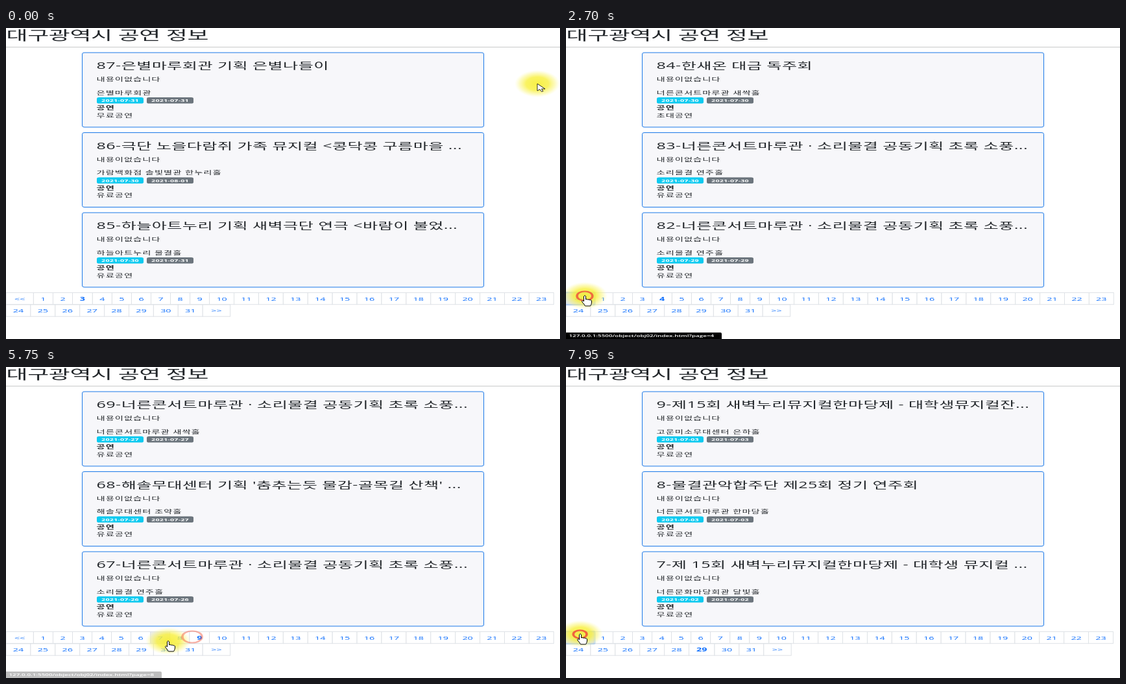
Recreate the animation shown at these times as an HTML page. Size 854x480 px, loop 8 s.

```html
<!DOCTYPE html>
<html lang="ko">
<head>
<meta charset="utf-8">
<title>공연 정보</title>
<style>
html, body { margin: 0; width: 100%; height: 100%; overflow: hidden; background: #fff; }
svg { display: block; width: 854px; height: 480px; }
text {
  font-family: "Open Sans", "Noto Sans CJK KR", "Noto Sans CJK", sans-serif;
  font-size: 16px; fill: #212529; white-space: pre;
}
.head { font-size: 40px; letter-spacing: -.4px; }
.title { font-size: 28px; letter-spacing: .5px; }
.body, .kind { letter-spacing: 1.05px; }
.kind { font-weight: 700; }
.badge { font-size: 12px; font-weight: 700; fill: #fff; letter-spacing: .2px; text-anchor: middle; }
.link, .active { fill: #0d6efd; text-anchor: middle; }
.active { font-weight: 700; }
.url { font-size: 11px; font-weight: 600; fill: #fff; }
</style>
</head>
<body>
<svg viewBox="0 0 854 480">
  <defs>
    <radialGradient id="glow">
      <stop offset="0" stop-color="#f7ee2c" stop-opacity=".88"/>
      <stop offset=".5" stop-color="#f8f03c" stop-opacity=".8"/>
      <stop offset=".78" stop-color="#faf46a" stop-opacity=".42"/>
      <stop offset="1" stop-color="#fdfaa0" stop-opacity="0"/>
    </radialGradient>
  </defs>
  <rect width="854" height="480" fill="#fff"/>
  <g id="header"></g>
  <g id="cards"></g>
  <g id="pager"></g>
  <g id="status"></g>
  <g id="pointer">
    <ellipse rx="35" ry="21" fill="url(#glow)"/>
  </g>
  <g id="ring" fill="none" stroke="#f0523a" stroke-width="3.6"><circle/></g>
  <g id="cursor" fill="#fff" stroke="#000">
    <path id="arrow" transform="scale(1 .64)" d="M0 0V17L4 13.5L6.5 19L9 18L6.5 12.5H12Z"/>
    <path id="hand" d="M-1.5 1Q0-1.5 1.5 1V6Q3 4.7 4.5 6.3Q6 5.3 7.5 6.8Q9.5 6 10.5 8V11Q10 14 8.5 16H.5Q-1 13-4 10Q-5 8-3.5 7.6Q-2.5 7.7-1.5 9Z"/>
  </g>
</svg>
<script>
const LOOP = 8000, STEP = 50;
const $ = id => document.getElementById(id);

// The whole page is squeezed by one common scale
const text = (x, y, cls, s) =>
  `<text class="${cls}" transform="translate(${x} ${y}) scale(.897 .5)">${s}</text>`;
const rect = (x, y, w, h, attrs) =>
  `<rect x="${x}" y="${y}" width="${w}" height="${h}" ${attrs}/>`;

const FREE = '무료공연', PAID = '유료공연', GUEST = '초대공연';
const HALL = '너른콘서트마루관', STAGE = '해솔무대센터', ROOM = '소리물결 연주홀';
const SUMMER = HALL + ' · 소리물결 공동기획 초록 소풍...';
const ART = STAGE + " 기획 '춤추는듯 물감-골목길 산책' ...";
const FEST = '새벽누리뮤지컬한마당제 - 대학생';

// title, place, first day, last day, price
const SHOWS = {
  1: [
    [ART, STAGE + ' 조약홀', '07-31', '07-31', PAID],
    ["윤서람 X 미온 콘서트 'Her Lanterns : 물결'", '물빛원 너울강당관', '07-31', '07-31', PAID],
    [SUMMER, HALL + ' 한마당홀', '07-31', '07-31', PAID]],
  3: [
    ['은별마루회관 기획 은별나들이', '은별마루회관', '07-31', '07-31', FREE],
    ['극단 노을다람쥐 가족 뮤지컬 &lt;콩닥콩 구름마을 ...', '가람백화점 솔빛별관 한누리홀', '07-30', '08-01', PAID],
    ['하늘아트누리 기획 새벽극단 연극 &lt;바람이 불었...', '하늘아트누리 물결홀', '07-30', '07-31', PAID]],
  4: [
    ['한새온 대금 독주회', HALL + ' 새싹홀', '07-30', '07-30', GUEST],
    [SUMMER, ROOM, '07-30', '07-30', PAID],
    [SUMMER, ROOM, '07-29', '07-29', PAID]],
  9: [
    [SUMMER, HALL + ' 새싹홀', '07-27', '07-27', PAID],
    [ART, STAGE + ' 조약홀', '07-27', '07-27', PAID],
    [SUMMER, ROOM, '07-26', '07-26', PAID]],
  29: [
    ['제15회 ' + FEST + '뮤지컬잔...', '고운미소무대센터 은하홀', '07-03', '07-03', FREE],
    ['물결관악합주단 제25회 정기 연주회', HALL + ' 한마당홀', '07-03', '07-03', PAID],
    ['제 15회 ' + FEST + ' 뮤지컬 ...', '너른문화마당회관 달빛홀', '07-02', '07-02', FREE]]
};
const SIMILAR = { 2: 1, 5: 9, 6: 9, 12: 9, 16: 4, 28: 29, 30: 29 };

// time, x, y
const PATH = [
  [0, 819, 86], [200, 819, 86], [700, 145, 414], [800, 145, 414], [1400, 43, 414],
  [1670, 316, 437], [1900, 316, 437], [2250, 28, 414], [2700, 29, 413], [3450, 27, 415],
  [4280, 409, 418], [4350, 409, 418], [4720, 560, 418], [4800, 560, 418], [5250, 287, 416],
  [5450, 287, 416], [6250, 170, 438], [6450, 170, 437], [7000, 315, 437], [7050, 315, 437],
  [7150, 311, 437], [7420, 314, 437], [7830, 21, 412], [7950, 22, 412]
];
// time, page opened
const CLICKS = [
  [800, 4], [1700, 5], [1850, 6], [2300, 5], [2600, 4], [2900, 3], [3150, 2], [3400, 1],
  [4300, 12], [4750, 16], [5300, 9], [6300, 28], [7050, 29], [7400, 30], [7900, 29]
];
// time, page in the link address, opacity
const LINKS = [
  [0, 3, 0], [1050, 3, 1], [1200, 2, 1], [1400, 1, 1], [1650, 5, 1], [1850, 6, 1],
  [2150, 3, 1], [2300, 5, 1], [2600, 4, 1], [2850, 3, 1], [3100, 2, 1], [3350, 1, 1],
  [3850, 5, 1], [4150, 12, 1], [4700, 16, 1], [5150, 9, 1], [5550, 8, 1], [5700, 8, .5],
  [5750, 8, .25], [5800, 8, 0], [6100, 28, 1], [6900, 28, 0], [7250, 30, 1], [7700, 30, 0]
];

const lastBefore = (list, t) => list.filter(e => e[0] <= t).pop();

function cursorAt(t) {
  const i = PATH.findIndex(k => k[0] > t);
  if (i < 0) return PATH[PATH.length - 1].slice(1);
  const [t0, x0, y0] = PATH[i - 1], [t1, x1, y1] = PATH[i];
  const u = (t - t0) / (t1 - t0), s = u * u * (3 - 2 * u);
  return [x0 + (x1 - x0) * s, y0 + (y1 - y0) * s];
}

function drawCards(page) {
  const shows = SHOWS[page] || SHOWS[SIMILAR[page]];
  $('cards').innerHTML = shows.map(([title, place, from, to, price], i) => {
    const y = 38 + 123.5 * i, no = 96 - 3 * page - i;
    const badge = (x, day, color) =>
      rect(x, y + 69, 72, 9.6, `rx="3.5" ry="2" fill="${color}"`) +
      text(x + 36, y + 76, 'badge', '2021-' + day);
    return rect(117.5, y, 619, 115, 'rx="3.5" ry="2" fill="#f7f7fa" stroke="#1a78e8"') +
      text(139.5, y + 25.3, 'title', no + '-' + title) +
      text(139.5, y + 44.2, 'body', '내용이없습니다') +
      text(139.5, y + 64.5, 'body', place) +
      badge(140, from, '#0dcaf0') + badge(217, to, '#6c757d') +
      text(139.5, y + 88, 'kind', '공연') +
      text(139.5, y + 99.6, 'body', price);
  }).join('');
}

function pagerCells(page) {
  const labels = ['&lt;&lt;', ...Array.from({ length: 31 }, (_, i) => i + 1), '&gt;&gt;'];
  let x = 0, y = 408.5;
  return labels.map((label, i) => {
    if (i === 24) { x = 0; y = 427; }
    const active = label === page, digits = i > 9 ? 2 : 1;
    let w = i % 32 === 0 ? 42.4 : digits === 1 ? 30.05 : 37.9;
    if (active) w += .8 * digits;
    const cell = { label, active, x, y, w };
    x += w;
    return cell;
  });
}

function drawPager(page, [mx, my], focused) {
  const over = c => mx >= c.x && mx < c.x + c.w && my >= c.y - .5 && my < c.y + 18;
  let front = '';
  const cells = pagerCells(page).map(c => {
    const hover = over(c);
    const s = rect(c.x, c.y, c.w, 18.2, `fill="${hover ? '#e9ecef' : '#fff'}" stroke="#dee2e6"`) +
      text(c.x + c.w / 2, c.y + 12.2, c.active ? 'active' : 'link', c.label);
    if (hover && focused)
      front = rect(c.x - 1.5, c.y - .5, c.w + 3.5, 19.2,
        'rx="2" fill="#0d6efd" fill-opacity=".06" stroke="#0d6efd" stroke-opacity=".22" stroke-width="2.5"');
    return s;
  });
  $('pager').innerHTML = cells.join('') + front;
}

function drawStatus([, page, alpha]) {
  $('status').setAttribute('opacity', alpha);
  $('status').innerHTML = '<path d="M0 470H238Q240 470 240 472V480H0Z"/>' +
    text(4.5, 477.2, 'url', '127.0.0.1:5500/object/obj02/index.html?page=' + page);
}

function drawPointer([x, y]) {
  const move = `translate(${x} ${y})`, link = y > 400;
  $('pointer').setAttribute('transform', move);
  $('cursor').setAttribute('transform', move);
  $('hand').setAttribute('opacity', link ? 1 : 0);
  $('arrow').setAttribute('opacity', link ? 0 : 1);
}

function drawRing(click, age) {
  const ring = $('ring');
  const alpha = click && age < 800 ? .95 - age / 900 : 0;
  ring.setAttribute('opacity', alpha);
  if (!alpha) return;
  const [x, y] = cursorAt(click[0]);
  ring.setAttribute('transform', `translate(${x} ${y + .5}) scale(1 .6)`);
  ring.firstChild.setAttribute('r', 8 + 7.3 * (1 - Math.exp(-age / 130)));
}

$('header').innerHTML = text(.5, 18.6, 'head', '대구광역시 공연 정보') +
  rect(0, 29, 854, 1, 'fill="#c8c9ca"');

let shownTick = -1, shownPage = 0;

function draw(t) {
  const click = lastBefore(CLICKS, t), age = click ? t - click[0] : Infinity;
  const opened = lastBefore(CLICKS, t - STEP);
  const page = opened ? opened[1] : 3;
  const pos = cursorAt(t);
  if (page !== shownPage) drawCards(shownPage = page);
  drawPager(page, pos, age < 200);
  drawStatus(lastBefore(LINKS, t));
  drawPointer(pos);
  drawRing(click, age);
}

const start = performance.now();
function frame() {
  const t = Math.max(0, performance.now() - start) % LOOP;
  const tick = Math.floor(t / STEP);
  if (tick !== shownTick) draw((shownTick = tick) * STEP);
  requestAnimationFrame(frame);
}
frame();
</script>
</body>
</html>
```
